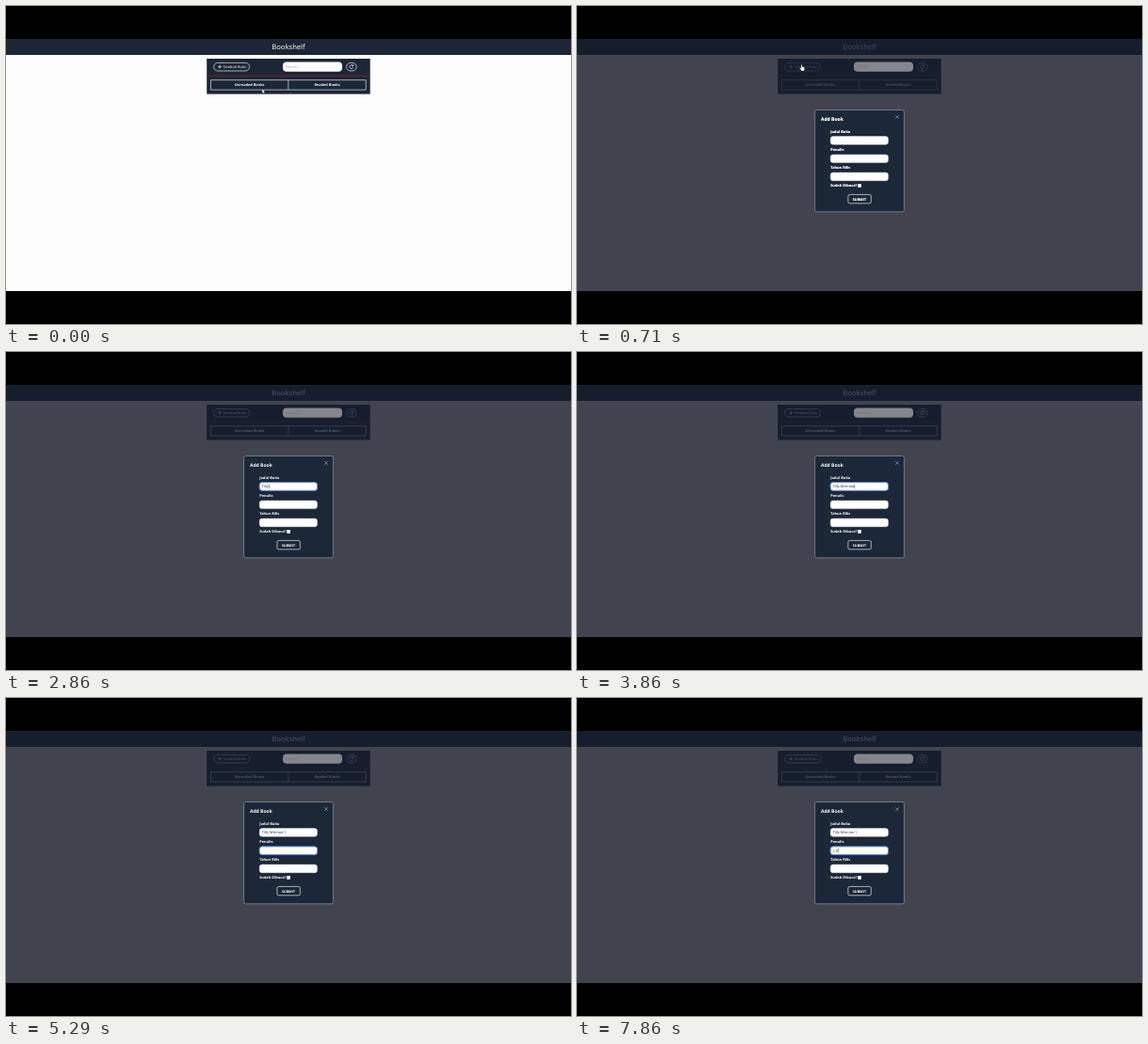
Write an HTML page that moves like this. It is 600 px wide and 338 px high and loops after 8 s.

```html
<!DOCTYPE html>
<html lang="id">
<head>
<meta charset="utf-8">
<title>Bookshelf</title>
<style>
  html, body { margin: 0; width: 100%; height: 100%; overflow: hidden; background: #000; }
  svg {
    display: block; width: 100%; height: 100%;
    font: 3.9px 'Noto Sans', 'Open Sans', sans-serif;
    text-rendering: geometricPrecision;
    --page: #fdfdfd; --bar: #1c2636; --ink: #f4f5f7; --edge: #e4e6ea;
    --rule: #8c2034; --field: #fff; --hint: #a9a4ae;
  }
  svg.dim {
    --page: #41444f; --bar: #161e2e; --ink: #4c5263; --edge: #3f4656;
    --rule: #20202f; --field: #85868c; --hint: #72747c;
  }
  svg.opening { --ink: #414757; --edge: #353c4b; }
  .bar { fill: var(--bar); }
  .ink { fill: var(--ink); }
  .line { fill: none; stroke: var(--edge); stroke-width: .7; }
  .mid { text-anchor: middle; }
  .semi { font-weight: 600; }
  .bold { font-weight: 700; }
  #modal { visibility: hidden; }
  .dim #modal { visibility: visible; }
  #labels { fill: #fff; }
  .opening #labels { filter: drop-shadow(.4px .5px 0 rgba(255, 255, 255, .6)); }
  .input { fill: #fff; stroke: #e8e8ee; stroke-width: .4; }
  .glow { fill: none; stroke: #4f83f5; stroke-width: .9; opacity: 0; }
  .value { fill: #333844; }
  .caret { fill: #222; }
</style>
</head>
<body>
<svg id="stage" viewBox="0 0 600 338" preserveAspectRatio="none">
  <rect width="600" height="338"/>
  <rect y="35" width="600" height="268" fill="var(--page)"/>
  <rect class="bar" y="35" width="600" height="17"/>
  <text class="ink mid" x="300" y="45.7" font-size="7.6" font-weight="500">Bookshelf</text>

  <rect class="bar" x="213.2" y="56" width="173.5" height="37.6"/>
  <rect class="line" x="220.6" y="60.4" width="38" height="8.6" rx="4.3"/>
  <path class="line" d="M225 64.6h4M227 62.6v4" style="stroke:var(--ink)"/>
  <text class="ink" x="230.4" y="66">Tambah Buku</text>
  <rect x="294" y="59.6" width="63" height="10.2" rx="4" fill="var(--field)"/>
  <text x="296.6" y="66" fill="var(--hint)">Search...</text>
  <rect class="line" x="361.6" y="60.4" width="10.6" height="8.6" rx="4.2"/>
  <path class="line" d="M368.6 63.6A2 2 0 1 0 368.8 65.3M368.9 62.2v1.7h-1.7" style="stroke:var(--ink)"/>
  <path d="M213.2 74.2h173.5" stroke="var(--rule)" stroke-width=".8"/>
  <path class="line" d="M217.5 78.7h164.7v10.4h-164.7zM299.8 78.7v10.4"/>
  <text class="ink mid semi" x="258.6" y="85.4">Unreaded Books</text>
  <text class="ink mid semi" x="341" y="85.4">Readed Books</text>

  <g id="modal">
    <rect x="252.6" y="110.5" width="94.8" height="108.3" rx="2" fill="#1c2737" stroke="#848c98" stroke-width=".8"/>
    <path d="M338.2 116.2l3.6 3.6m0-3.6l-3.6 3.6" stroke="#a3a9b3" stroke-width=".6"/>
    <g id="labels" class="semi">
      <text class="bold" x="259" y="122.2" font-size="5">Add Book</text>
      <text x="269.2" y="134.6">Judul Buku</text>
      <text x="269.2" y="153.8">Penulis</text>
      <text x="269.2" y="172.8">Tahun Rilis</text>
      <text x="269.2" y="192.2">Sudah Dibaca?</text>
      <text class="mid bold" x="300" y="206.5" font-size="3.7">SUBMIT</text>
    </g>
    <rect x="298.2" y="189" width="3.6" height="3.8" rx=".6" fill="#fff"/>
    <rect x="287.9" y="200.4" width="24.4" height="9.4" rx="1.6" fill="none" stroke="#e6e8ec" stroke-width=".7"/>
    <g id="fields"></g>
  </g>

  <g id="pointer">
    <path id="arrow" d="M0 0v4.3l1-.9.7 1.6.8-.4-.7-1.5h1.3z" fill="#fff" stroke="#111" stroke-width=".25"/>
    <path id="hand" d="M1 0q.6-.3.8.4l.3 2 2 .5q.7.3.6 1l-.6 2.8h-2.6l-2-2.5q0-.9 1-.4l.4.3z" fill="#fff" stroke="#222" stroke-width=".25"/>
    <path id="beam" d="M-.7-1.8h1.4M0-1.8v3.6M-.7 1.8h1.4" stroke="#777" stroke-width=".4"/>
  </g>
</svg>
<script>
const LOOP = 8000;
const $ = id => document.getElementById(id);
const stage = $('stage');

const moves = [
  [0, 272, 88.2, 'arrow'], [140, 262, 81, 'arrow'], [290, 246, 70, 'arrow'],
  [430, 237, 62.2, 'hand'], [860, 247, 78, 'arrow'], [1000, 262, 102, 'arrow'],
  [1140, 276, 126, 'arrow'], [1290, 284, 140, 'beam'], [1430, 286, 142.8, 'beam'],
  [2000, 286, 142.8, '']
];

// keys: [time, characters typed so far]
const fields = [
  { y: 138.6, text: 'Tilly Merrow 1', focus: [1500, 4570],
    keys: [[0, 0], [2140, 1], [2290, 2], [2570, 3], [2860, 5], [3140, 6], [3290, 7],
           [3430, 8], [3570, 9], [3710, 10], [3860, 12], [4140, 13], [4290, 14]],
    caret: [[0, 1]] },
  { y: 157.9, text: 'L.F', focus: [4710, LOOP + 200],
    keys: [[0, 0], [6860, 1], [7140, 2], [7570, 3]],
    caret: [[0, 1], [5000, 0], [5430, 1], [5860, 0], [6290, 1]] },
  { y: 177, text: '', focus: [LOOP, LOOP], keys: [[0, 0]], caret: [[0, 0]] }
];

function add(tag, attrs) {
  const el = document.createElementNS('http://www.w3.org/2000/svg', tag);
  for (const key in attrs) el.setAttribute(key, attrs[key]);
  return $('fields').appendChild(el);
}

for (const f of fields) {
  const box = { x: 269.2, y: f.y, width: 61.3, height: 8.7, rx: 2.8 };
  add('rect', { class: 'input', ...box });
  f.glow = add('rect', { class: 'glow', ...box });
  f.value = add('text', { class: 'value', x: 271.7, y: f.y + 5.6 });
  f.bar = add('rect', { class: 'caret', y: f.y + 1.9, width: .45, height: 4.8 });
}

const at = (steps, t) => steps.findLast(step => step[0] <= t);
const ramp = (t, start, span) => Math.min(1, Math.max(0, (t - start) / span));

function drawField(f, t) {
  const [start, end] = f.focus;
  f.glow.style.opacity = ramp(t, start, 150) * (1 - ramp(t, end, 150));
  const typed = f.text.slice(0, at(f.keys, t)[1]);
  if (f.value.textContent !== typed) f.value.textContent = typed;
  // A trailing space is not measured, so it is added by hand.
  const width = typed ? f.value.getComputedTextLength() + (typed.endsWith(' ') ? 1 : 0) : 0;
  f.bar.setAttribute('x', 271.4 + width + (typed ? .4 : 0));
  f.bar.style.opacity = t >= start && t < end ? at(f.caret, t)[1] : 0;
}

function draw(t) {
  stage.classList.toggle('dim', t >= 710);
  stage.classList.toggle('opening', t >= 710 && t < 860);
  const [, x, y, kind] = at(moves, t);
  $('pointer').setAttribute('transform', `translate(${x} ${y})`);
  for (const id of ['arrow', 'hand', 'beam']) $(id).style.display = id === kind ? '' : 'none';
  for (const f of fields) drawField(f, t);
}

const begin = performance.now();
function tick() {
  draw((performance.now() - begin) % LOOP);
  requestAnimationFrame(tick);
}
tick();
</script>
</body>
</html>
```
